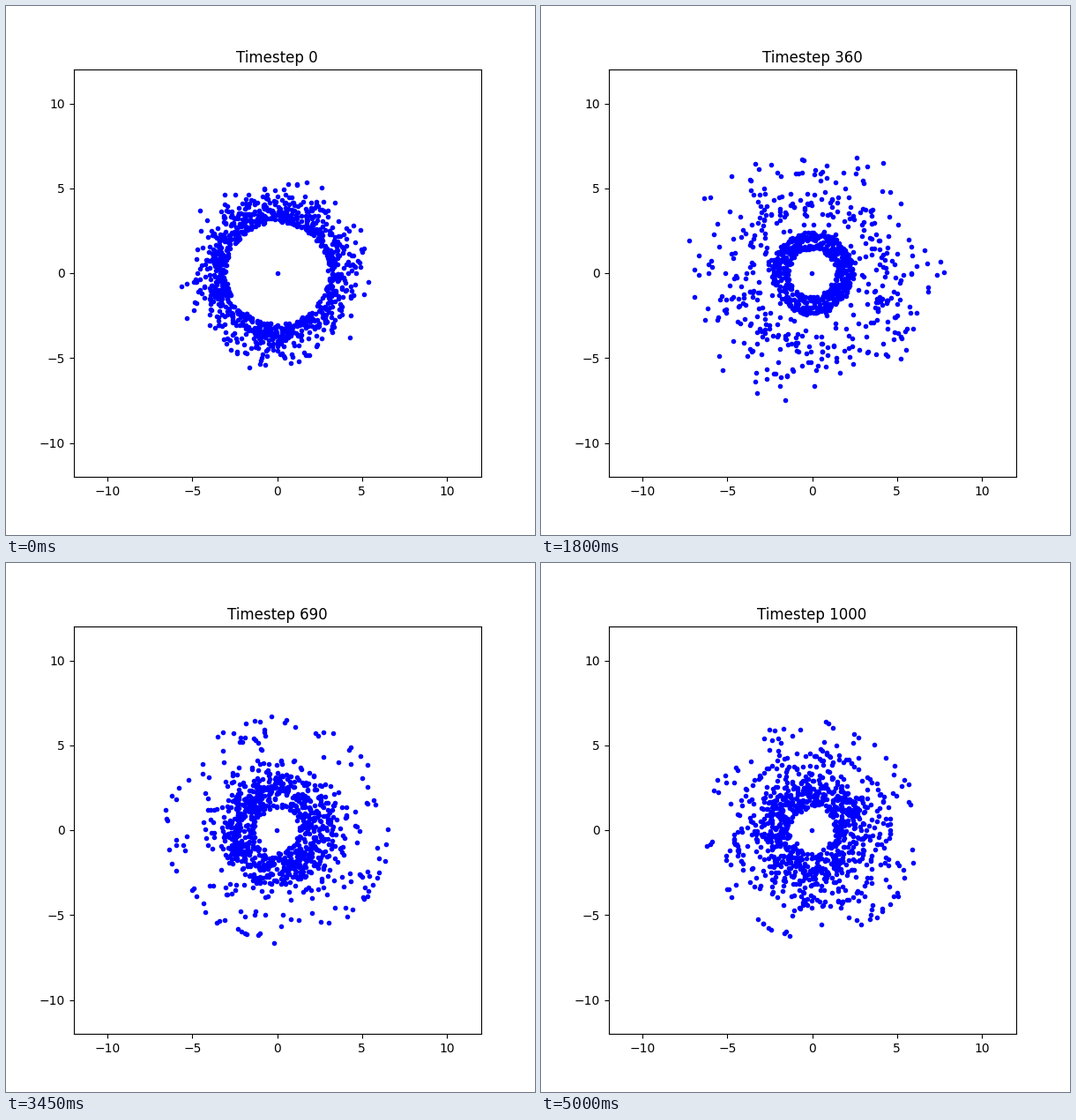
A matplotlib script that plays this animation: 600 by 600 pixels, repeating every 5050 ms.

```python
import numpy as np
import matplotlib.pyplot as plt
from matplotlib.animation import FuncAnimation

COUNT = 1000        # disc particles around the central body
FRAMES = 101
STEPS = 10          # time steps per frame
COLLAPSE = 190      # time at which the infall joins the bound orbits
PERIOD = 37.2       # orbital period of a unit semi-major axis

rng = np.random.default_rng(12)

# Starting disc: sharp inner edge, thinning outwards
start = 3 + np.abs(rng.normal(0, 1, COUNT))
start = np.minimum(start, 6.3)
angle = rng.uniform(0, 2 * np.pi, COUNT)

# Orbits after the collapse: dense core and sparse halo
rank = np.argsort(np.argsort(start + rng.normal(0, 0.6, COUNT))) / (COUNT - 1)
apo = np.interp(rank, [0, 0.55, 0.62, 0.83, 0.945, 0.98, 1],
                [2.3, 3.4, 4.3, 5.1, 6.3, 7.0, 8.3])
halo = np.clip((apo - 3.2) / 1.4, 0, 1)
peri = 1.42 + 0.7 * halo + np.clip(rng.normal(0, 0.09, COUNT), -0.2, 0.25)
peri_time = 225 - 25 * halo + rng.normal(0, 3, COUNT)
axis = (apo + peri) / 2
ecc = (apo - peri) / (apo + peri)
period = PERIOD * axis ** 1.5
spin = 2 * np.pi * axis * np.sqrt(apo * peri) / period


def orbit_radius(t):
    """Distance from the centre on a Kepler ellipse at time t."""
    mean = 2 * np.pi * (t - peri_time) / period
    mean = (mean + np.pi) % (2 * np.pi) - np.pi
    e_anom = mean + ecc * np.sin(mean)
    for _ in range(6):
        e_anom -= ((e_anom - ecc * np.sin(e_anom) - mean)
                   / (1 - ecc * np.cos(e_anom)))
    return axis * (1 - ecc * np.cos(e_anom))


joint = orbit_radius(COLLAPSE)
joint_speed = (orbit_radius(COLLAPSE - 1) - orbit_radius(COLLAPSE + 1)) / 2
drop = np.maximum(start - joint, 0.1)
power = np.clip(joint_speed * COLLAPSE / drop, 1.6, 4)


def radius(t):
    if t < COLLAPSE:
        return start + (joint - start) * (t / COLLAPSE) ** power
    return orbit_radius(t)


def trace():
    """Positions for every frame, turning with constant angular momentum."""
    theta = angle.copy()
    dt = 2
    path = []
    for t in range(0, (FRAMES - 1) * STEPS + 1, dt):
        if t % STEPS == 0:
            r = radius(t)
            path.append((r * np.cos(theta), r * np.sin(theta)))
        theta = theta + spin / radius(t + dt / 2) ** 2 * dt
    return path


path = trace()

fig, ax = plt.subplots(figsize=(6, 6), dpi=100)
ax.set_aspect("equal")
ax.set_xlim(-12, 12)
ax.set_ylim(-12, 12)
dots, = ax.plot([], [], "b.")
title = ax.set_title("Timestep 0")


def draw(i):
    t = i * STEPS
    x, y = path[i]
    centre = -0.02 * min(t / COLLAPSE, 1)
    dots.set_data(np.append(x, centre), np.append(y, 0))
    title.set_text(f"Timestep {t}")
    return dots, title


anim = FuncAnimation(fig, draw, frames=FRAMES, interval=50, repeat=True)
plt.show()
```
